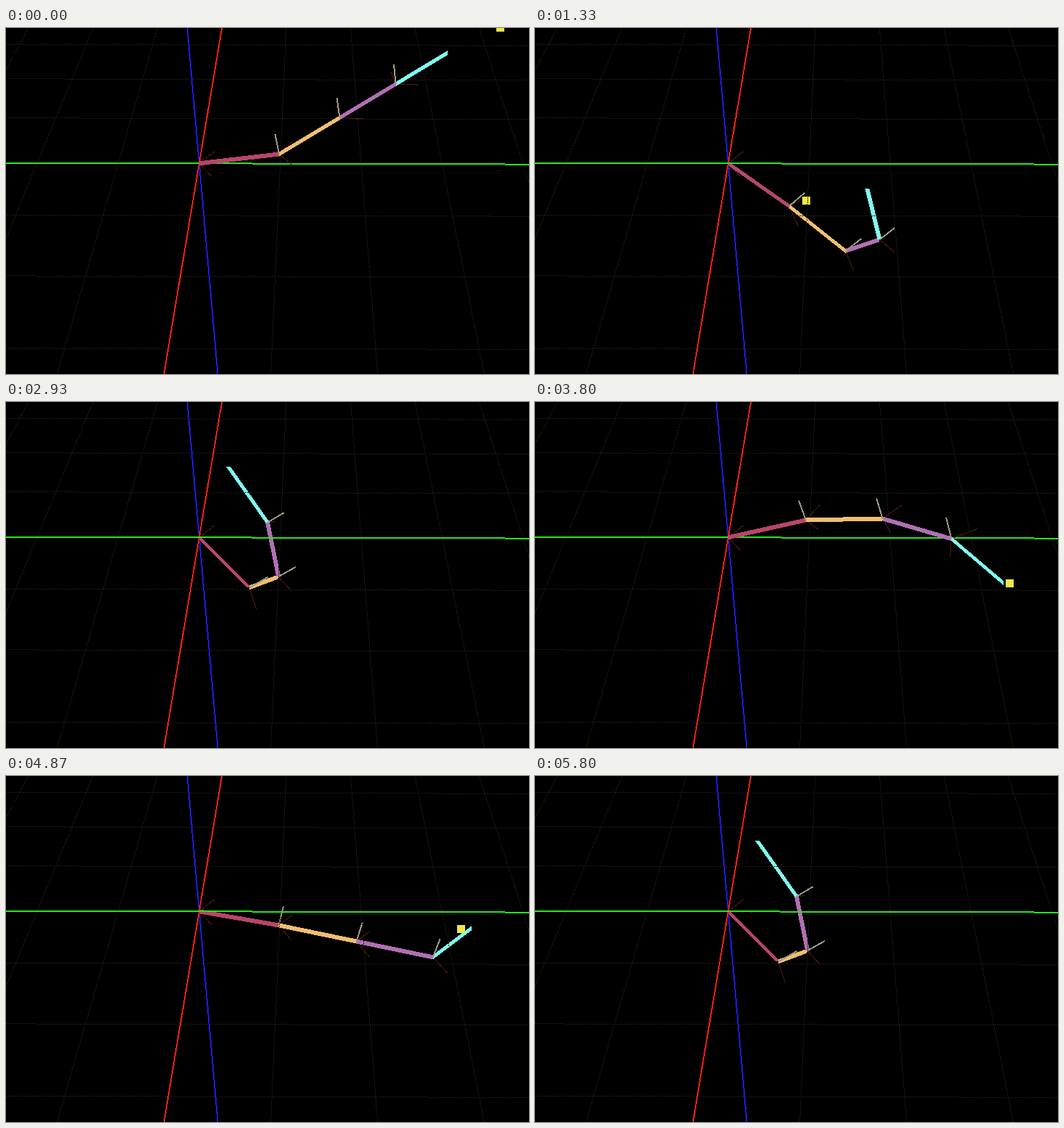
Animation, 720 px wide and 476 px high, one loop 5870 ms. Source, as an HTML page:

```html
<!DOCTYPE html>
<html lang="en">
<head>
<meta charset="utf-8">
<title>Robot arm</title>
<style>
html, body { margin: 0; width: 100%; height: 100%; overflow: hidden; background: #000; }
svg { display: block; width: 720px; height: 476px; }
</style>
</head>
<body>
<svg id="stage" viewBox="0 0 720 476" shape-rendering="crispEdges" fill="none"></svg>
<script>
const LOOP = 5870;
const STEP = 200 / 3;
const LIMIT = 54;
const COLORS = ['#b8466a', '#f2be70', '#b070b4', '#80fff0'];

function add(parent, tag, attrs = {}) {
  const el = document.createElementNS('http://www.w3.org/2000/svg', tag);
  for (const k in attrs) el.setAttribute(k, attrs[k]);
  return parent.appendChild(el);
}

// World to screen: x comes toward the viewer, y goes right, z goes up.
function project([x, y, z]) {
  const w = 1 - 0.073 * x - 0.054 * z;
  return [
    266 + (111.5 * y - 11.1 * x - 7.85 * z) / w,
    186.3 + (66.3 * x - 89 * z + 0.32 * y) / w
  ];
}

const line = (a, b) => `M${project(a)}L${project(b)}`;
const rad = deg => deg * Math.PI / 180;
const clamp = v => Math.max(0, Math.min(1, v));
// a + p * u + q * v
const mix = (a, p, u, q = 0, v = u) => a.map((n, i) => n + p * u[i] + q * v[i]);

const stage = document.getElementById('stage');
const arm = add(stage, 'g');
const world = add(stage, 'g');

let grid = '';
for (let n = -4; n <= 5; n++) {
  if (n) grid += line([-4, n, 0], [3.6, n, 0]);
  if (n && n < 4) grid += line([n, -4, 0], [n, 6, 0]);
}
add(world, 'path', { d: grid, stroke: '#1d1d12', 'stroke-dasharray': '2 1' });
add(world, 'path', { d: line([0, 0, -4.2], [0, 0, 2.2]), stroke: '#1c1cda', 'stroke-width': 2 });
add(world, 'path', { d: line([-4, 0, 0], [3.6, 0, 0]), stroke: '#f02010', 'stroke-width': 2 });
add(world, 'path', { d: line([0, -3, 0], [0, 5, 0]), stroke: '#28e618', 'stroke-width': 2 });

const floorAxes = add(arm, 'path', { stroke: '#581a14' });
const links = COLORS.map(fill => add(arm, 'path', { fill }));
const upAxes = add(arm, 'path', { stroke: '#9c9a84', 'stroke-width': 2 });
const goal = add(arm, 'rect', { width: 11, height: 11, fill: '#f0e846' });

// Time, tilt of the plane, swing of the second link, curl from the tip inward.
const KEYS = [
  [0, -8.4, 40, 0],
  [330, 20, -41, 0],
  [600, 2, 27, 0],
  [870, 5, -10, 0],
  [1200, 35, -48, 1.5],
  [1330, 43, -6, 2],
  [1600, LIMIT, 0, 3],
  [3330, LIMIT, 0, 3],
  [3530, 43, -6, 2],
  [3670, -5, 28, 0],
  [3800, -15.5, 4, -0.42],
  [4070, -5, 27, 0],
  [4400, 20, -41, 0],
  [4870, 12.3, -3, 1],
  [5530, LIMIT, 0, 3],
  [LOOP, LIMIT, 0, 3]
];

// Passes of the goal: start, end and three points of a quadratic curve.
const PASSES = [
  [0, 70, [680, -1], [690, -12], [700, -24]],
  [930, 1800, [738, 262], [342, 286], [-54, 92]],
  [3270, 3870, [-30, 110], [400, 220], [732, 260]],
  [4670, 5800, [780, 210], [338, 222], [-25, 103]]
];

// The slope is flat at turning points, so no curve overshoots its keys.
function slope(i, c) {
  const a = KEYS[i - 1], b = KEYS[i], d = KEYS[i + 1];
  if (!a || !d) return 0;
  const m = (b[c] - a[c]) / (b[0] - a[0]), n = (d[c] - b[c]) / (d[0] - b[0]);
  return m * n <= 0 ? 0 : 2 * m * n / (m + n);
}

function pose(t) {
  const i = KEYS.findIndex((k, n) => t < KEYS[n + 1][0]);
  const h = KEYS[i + 1][0] - KEYS[i][0];
  const u = (t - KEYS[i][0]) / h, ease = u * u * (3 - 2 * u);
  return [1, 2, 3].map(c => KEYS[i][c] + (KEYS[i + 1][c] - KEYS[i][c]) * ease +
    h * u * (1 - u) * ((1 - u) * slope(i, c) - u * slope(i + 1, c)));
}

// Link ends are cut along the minor screen axis.
function bar(a, b) {
  const [x, y] = project(a), [p, q] = project(b);
  const [ox, oy] = Math.abs(p - x) >= Math.abs(q - y) ? [0, 3] : [3, 0];
  return `M${x - ox} ${y - oy}L${p - ox} ${q - oy}L${p + ox} ${q + oy}L${x + ox} ${y + oy}z`;
}

function drawArm(t) {
  const [tilt, swing, curl] = pose(t);
  const c = Math.cos(rad(tilt)), s = Math.sin(rad(tilt));
  const out = [0, c, -s], near = [1, 0, 0], up = [0, s, c];
  const fold = n => LIMIT * (curl < 0 ? curl : clamp(curl - n));
  const bends = [0, swing + fold(2), fold(1), fold(0)];
  const cross = (p, dir, side) =>
    line(p, mix(p, 0.17, dir, 0.26, side)) + line(p, mix(p, 0.17, dir, -0.26, side));

  let p = [0, 0, 0], angle = 0, flat = cross(p, [0, 1, 0], near), tall = '';
  bends.forEach((bend, i) => {
    angle += rad(bend);
    const ca = Math.cos(angle), sa = Math.sin(angle);
    const dir = mix([0, 0, 0], ca, out, -sa, near);
    const side = mix([0, 0, 0], sa, out, ca, near);
    const end = mix(p, 1, dir);
    links[i].setAttribute('d', bar(p, end));
    p = end;
    if (i < 3) {
      flat += cross(p, dir, side);
      tall += line(p, mix(p, 0.3, up));
    }
  });
  floorAxes.setAttribute('d', flat);
  upAxes.setAttribute('d', tall);
  // Below the floor plane the grid covers the arm.
  stage.insertBefore(tilt > 0 ? arm : world, stage.firstChild);
}

function drawGoal(t) {
  const pass = PASSES.find(([from, to]) => t >= from && t < to);
  goal.style.display = pass ? '' : 'none';
  if (!pass) return;
  const [from, to, a, b, d] = pass;
  const u = (t - from) / (to - from), v = 1 - u;
  const at = i => Math.round(v * v * a[i] + 2 * u * v * b[i] + u * u * d[i] - 5.5);
  goal.setAttribute('x', at(0));
  goal.setAttribute('y', at(1));
}

// The picture is held for one step at a time.
function tick(t) {
  const start = n => Math.round(n * STEP / 10) * 10;
  let k = Math.floor(t / STEP) + 1;
  while (start(k) > t) k--;
  drawArm(start(k));
  drawGoal(start(k));
}

const t0 = performance.now();
function loop() {
  tick((performance.now() - t0) % LOOP);
  requestAnimationFrame(loop);
}
loop();
</script>
</body>
</html>
```
